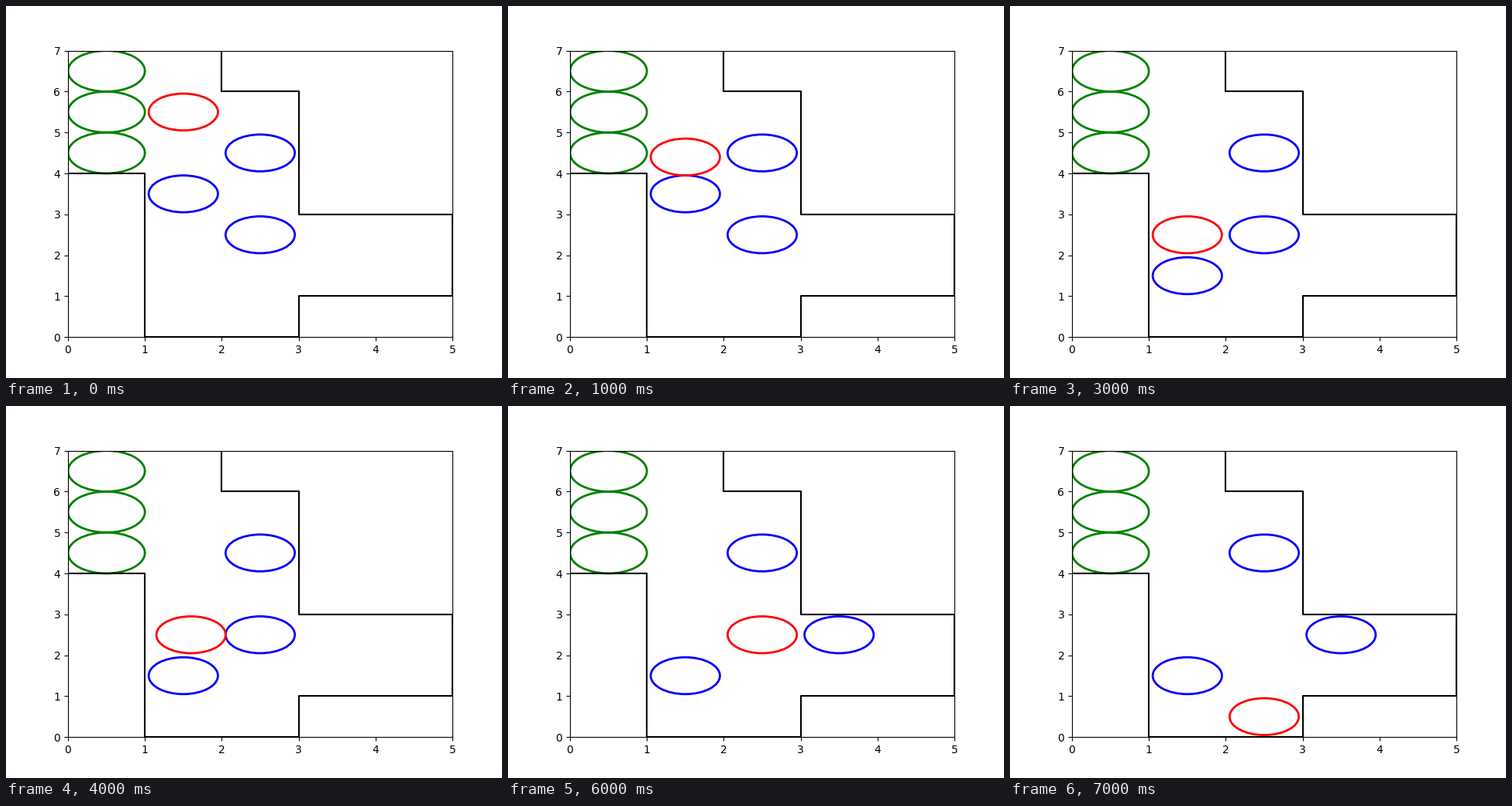
These frames come from a looping animation (640 px wide and 480 px high, 8 s). A matplotlib script:

```python
import matplotlib.pyplot as plt
from matplotlib.animation import FuncAnimation
from matplotlib.patches import Circle

STEP_MS = 1000

WALL = [(0, 7), (2, 7), (2, 6), (3, 6), (3, 3), (5, 3), (5, 1),
        (3, 1), (3, 0), (1, 0), (1, 4), (0, 4), (0, 7)]
GOALS = [(0.5, 4.5), (0.5, 5.5), (0.5, 6.5)]
BOXES = [(2.5, 4.5), (1.5, 3.5), (2.5, 2.5)]
START = (1.5, 5.5)

# Each step: player shift, then the index and shift of a pushed box.
STEPS = [
    ((0, 0), None, (0, 0)),
    ((0, -1.1), None, (0, 0)),    # walk down to touch a box
    ((0, -2), 1, (0, -2)),        # push it down
    ((0, 0.1), None, (0, 0)),     # settle in the cell
    ((0.1, 0), None, (0, 0)),     # lean on the next box
    ((1, 0), 2, (1, 0)),          # push it right
    ((-0.1, 0), None, (0, 0)),    # settle in the cell
    ((0, -2), None, (0, 0)),      # walk down
]

fig, ax = plt.subplots(figsize=(6.4, 4.8), dpi=100)
ax.set_xlim(0, 5)
ax.set_ylim(0, 7)
ax.plot(*zip(*WALL), color="black", lw=1.5)


def ring(center, radius, color):
    return ax.add_patch(Circle(center, radius, fill=False, ec=color, lw=2))


for goal in GOALS:
    ring(goal, 0.5, "green")
boxes = [ring(pos, 0.45, "blue") for pos in BOXES]
player = ring(START, 0.45, "red")


def shift(pos, delta):
    return pos[0] + delta[0], pos[1] + delta[1]


def draw(frame):
    player_pos, box_pos = START, list(BOXES)
    for move, pushed, push in STEPS[:frame + 1]:
        player_pos = shift(player_pos, move)
        if pushed is not None:
            box_pos[pushed] = shift(box_pos[pushed], push)
    player.center = player_pos
    for box, pos in zip(boxes, box_pos):
        box.center = pos
    return [player, *boxes]


anim = FuncAnimation(fig, draw, frames=len(STEPS), interval=STEP_MS,
                     repeat=True, repeat_delay=0)
plt.show()
```
